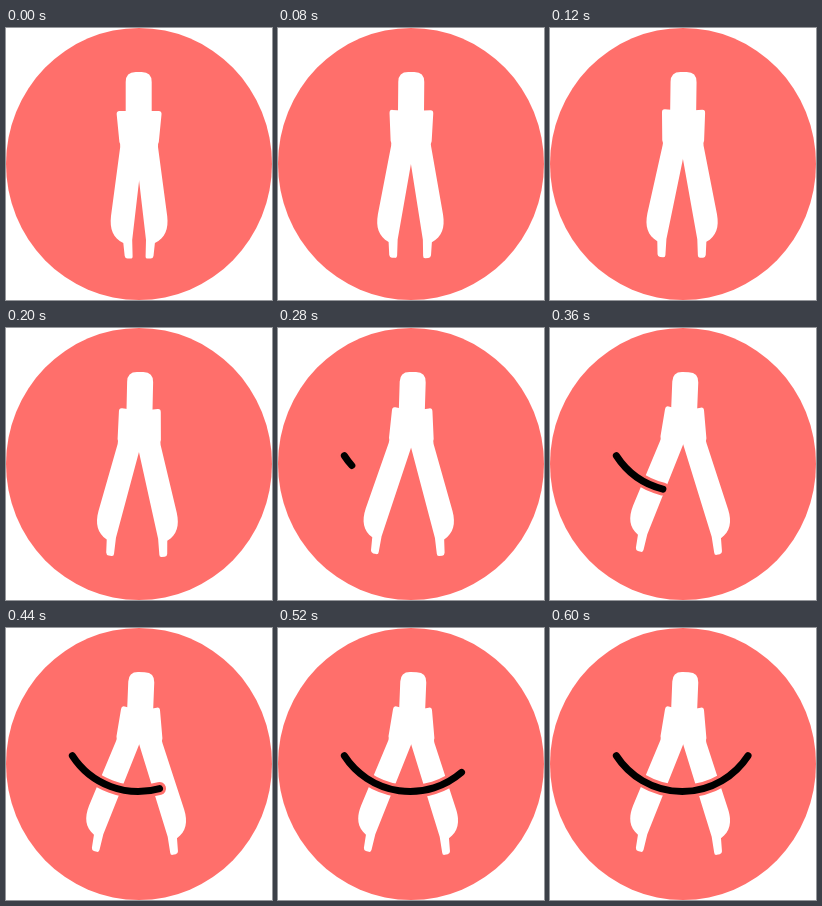
Animation of 266 by 272 pixels, one loop 1.92 s. Source, as an HTML page:

```html
<!DOCTYPE html>
<html lang="en">
<head>
<meta charset="utf-8">
<title>Compass</title>
<style>
  html, body { margin: 0; width: 100%; height: 100%; overflow: hidden; background: #fff; }
  svg { display: block; width: 100%; height: 100%; }
  .arc { fill: none; stroke-linecap: round; }
</style>
</head>
<body>
<svg viewBox="0 0 266 272">
  <defs>
    <path id="leg" d="M113.5 83 Q110.3 83 110.7 86.5 L113.4 114 Q114.6 116 114.2 119
      L105 188 C103.5 201 107 210 117.3 215 L118.7 228 Q119.2 230.6 121.5 230.6
      L124.5 230.6 Q126.8 230.6 126.6 228 L126.2 212 L139 102 V83 Z"/>
  </defs>
  <ellipse cx="133" cy="136" rx="133" ry="136" fill="#ff6f6b"/>
  <g id="compass" fill="#fff">
    <path d="M119.7 100 V54 Q119.7 44 129.7 44 H135.7 Q145.7 44 145.7 54 V100 Z"/>
    <use id="left" href="#leg"/>
    <g transform="translate(266.2 0) scale(-1 1)"><use id="right" href="#leg"/></g>
  </g>
  <path id="halo" class="arc" stroke="#ff6f6b" stroke-width="13"/>
  <path id="line" class="arc" stroke="#000" stroke-width="7"/>
</svg>
<script>
  const LOOP = 1920, STEP = 40, OPEN_END = 360, DRAW_START = 260, DRAW_END = 600;
  const ARC = { x: 132.2, y: 85, r: 78.5, from: 147, to: 33 };
  const el = id => document.getElementById(id);
  const clamp = v => Math.min(1, Math.max(0, v));

  function arcPoint(deg) {
    const a = deg * Math.PI / 180;
    return (ARC.x + ARC.r * Math.cos(a)).toFixed(2) + ' ' + (ARC.y + ARC.r * Math.sin(a)).toFixed(2);
  }

  function arcPath(part) {
    if (part <= 0) return '';
    const end = ARC.from + (ARC.to - ARC.from) * part;
    return `M${arcPoint(ARC.from)} A${ARC.r} ${ARC.r} 0 0 0 ${arcPoint(end)}`;
  }

  function render(ms) {
    const t = Math.floor((ms % LOOP) / STEP) * STEP;
    const open = clamp(t / OPEN_END);
    el('compass').setAttribute('transform', `rotate(${2.3 * open} 133 118)`);
    for (const id of ['left', 'right'])
      el(id).setAttribute('transform', `rotate(${12.8 * open} 133 97)`);

    const s = clamp((t - DRAW_START) / (DRAW_END - DRAW_START));
    const d = arcPath(1 - Math.pow(1 - s, 1.35));
    el('halo').setAttribute('d', d);
    el('line').setAttribute('d', d);
  }

  let start = null;
  function tick(now) {
    if (start === null) start = now;
    render(Math.max(0, now - start));
    requestAnimationFrame(tick);
  }
  render(0);
  requestAnimationFrame(tick);
</script>
</body>
</html>
```
